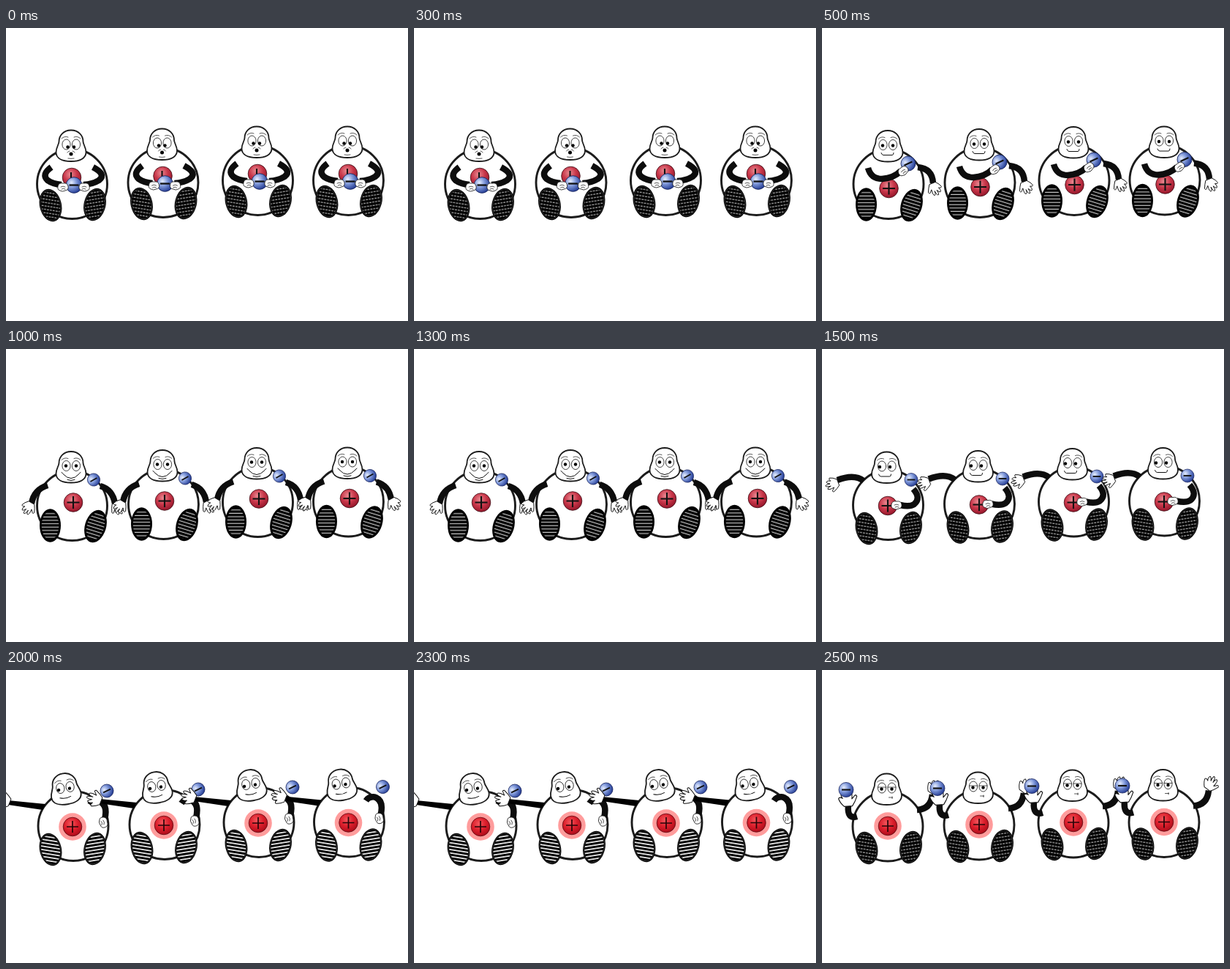
An HTML page without scripts that plays this animation: 550x400 px, repeating every 3000 ms.

```html
<!DOCTYPE html>
<html lang="en">
<head>
<meta charset="utf-8">
<title>Four round figures passing charges</title>
<style>
  html, body { margin: 0; width: 100%; height: 100%; overflow: hidden; background: #fff; }
  svg { display: block; width: 550px; height: 400px; }
  .pose { visibility: hidden; animation: show 3s step-end calc(var(--step) * .5s) infinite; }
  @keyframes show {
    0% { visibility: visible; }
    16.6666%, 100% { visibility: hidden; }
  }
  .body { fill: #fff; stroke: #1c1c1c; stroke-width: 2.9; }
  .skin { fill: #fff; stroke: #111; stroke-width: .8; stroke-linejoin: round; }
  .line { fill: none; stroke: #111; stroke-width: 1; stroke-linecap: round; }
  .thin { stroke-width: .7; }
  .arm { fill: none; stroke: #0d0d0d; stroke-width: 8.5; }
  .sign { fill: none; stroke: #111; stroke-width: 2.1; }
  .sole { fill: var(--sole, url(#fine)); }
  .out { fill: var(--sole, url(#slant)); }
</style>
</head>
<body>
<svg viewBox="0 0 550 400">
  <defs>
    <radialGradient id="blue" cx=".34" cy=".34" r=".72">
      <stop offset="0" stop-color="#e6edfd"/>
      <stop offset=".45" stop-color="#7f98da"/>
      <stop offset="1" stop-color="#1f3790"/>
    </radialGradient>
    <radialGradient id="red" cx=".42" cy=".34" r=".7">
      <stop offset="0" stop-color="#e88a92"/>
      <stop offset=".5" stop-color="#c9374a"/>
      <stop offset="1" stop-color="#8f1327"/>
    </radialGradient>
    <radialGradient id="hot" cx=".42" cy=".34" r=".7">
      <stop offset="0" stop-color="#f2565c"/>
      <stop offset=".5" stop-color="#dc1f2c"/>
      <stop offset="1" stop-color="#a80a18"/>
    </radialGradient>

    <pattern id="fine" width="40" height="4.6" patternUnits="userSpaceOnUse">
      <path d="M0 2H40" stroke="#fff"/>
    </pattern>
    <pattern id="slant" width="4" height="4.6" patternUnits="userSpaceOnUse" patternTransform="rotate(22)">
      <path d="M0 2H2.8" stroke="#fff" stroke-width=".9"/>
    </pattern>
    <pattern id="bold" width="40" height="4.6" patternUnits="userSpaceOnUse" patternTransform="rotate(22)">
      <path d="M0 2H40" stroke="#fff" stroke-width="1.6"/>
    </pattern>

    <g id="foot">
      <ellipse rx="14.5" ry="22.8"/>
      <ellipse class="sole" rx="11.8" ry="19.5"/>
    </g>
    <g id="footOut" transform="rotate(-13)">
      <ellipse rx="15" ry="22.5"/>
      <ellipse rx="13.6" ry="21" fill="none" stroke="#777" stroke-width=".4"/>
      <ellipse class="out" rx="12.6" ry="19.8"/>
    </g>
    <g id="feetOut">
      <use href="#footOut" x="61" y="243"/>
      <use href="#footOut" transform="translate(121.5 242) scale(-1 1)"/>
    </g>
    <g id="feetFlat">
      <use href="#foot" x="60.5" y="241"/>
      <use href="#foot" transform="translate(122.5 242) rotate(17)"/>
    </g>

    <ellipse id="body" class="body" cx="90.5" cy="213" rx="48" ry="47.5"/>

    <g id="head">
      <path d="M0-21.5C10-21.5 16.5-14.500 16.500-6C16.500-2 20.500 2 20.500 8.500C20.500 17 12 21 0 21S-20.500 17-20.500 8.500C-20.500 2-16.500-2-16.500-6C-16.500-14.500-10-21.500 0-21.500Z" fill="#fff" stroke="#1c1c1c" stroke-width="1.8"/>
      <g class="skin">
        <ellipse cx="-6.500" cy="-2" rx="5.600" ry="7"/>
        <ellipse cx="7" cy="-2" rx="5.600" ry="7"/>
      </g>
      <path class="line thin" d="M-13-10Q-9-14-4-12M4-12Q9-14 13-10"/>
    </g>
    <g id="pupils"><circle cx="-7" r="2.2"/><circle cx="7" r="2.2"/></g>
    <path id="flatMouth" class="line" d="M-9 9Q-8 12-6 12H6Q8 12 8 9"/>

    <path id="hand" class="skin" d="M-4 0Q-7 4-9 9Q-8 12-6 9L-4 7Q-5 14-3 15Q-1 15-1 10Q0 17 2 16Q3 15 2 10Q5 15 6 13Q7 11 5 8Q8 10 9 8Q8 4 4 0Z"/>
    <g id="fist">
      <path class="skin" d="M-7-1Q-6-6 0-5Q6-6 7-1Q8 4 3 5Q-1 7-4 5Q-8 4-7-1Z"/>
      <path class="line thin" d="M-3 0Q0-2 3 0M-2 3Q0 1 3 3"/>
    </g>

    <g id="minus">
      <circle r="10" fill="url(#blue)" stroke="#18245c" stroke-width=".8"/>
      <path class="sign" d="M-6 0H6"/>
    </g>
    <circle id="redBall" r="12.8" fill="url(#red)" stroke="#3a0c14" stroke-width=".8"/>
    <g id="plus">
      <use href="#redBall"/>
      <path class="sign" d="M-8.5 0H8.5M0-8.5V8.5"/>
    </g>
    <g id="hotPlus">
      <circle r="18.8" fill="#ff9c9c"/>
      <circle r="12.8" fill="url(#hot)" stroke="#5a0810" stroke-width=".8"/>
      <path d="M-8 0H8M0-8V8" stroke="#2a0508" stroke-width="1.7"/>
    </g>
  </defs>

  <!-- holding both charges -->
  <g class="pose" style="--step:0">
    <g id="hold">
      <use href="#body"/>
      <g transform="translate(89 161)">
        <use href="#head"/>
        <circle cx="-4.500" cy="1.500" r="2.200"/><circle cx="4" cy="1.500" r="2.200"/>
        <circle cy="11" r="2.500"/>
        <path class="line thin" d="M-5 9Q-4 7-2 7M2 7Q4 7 5 9M-4 17Q0 18 4 17"/>
      </g>
      <use href="#redBall" x="90" y="204"/>
      <path class="sign" d="M89 197V206"/>
      <path class="arm" d="M62 190Q48 200 57 208Q64 213 76 214M119 190Q138 200 127 208Q119 213 106 214"/>
      <use href="#minus" transform="translate(93 214.500) scale(1.08)"/>
      <use href="#fist" x="78" y="217"/>
      <use href="#fist" transform="translate(107 217) scale(-1 1)"/>
      <use href="#feetOut" y="-1"/>
    </g>
    <use href="#hold" x="124.5" y="-2"/>
    <use href="#hold" x="254" y="-5"/>
    <use href="#hold" x="378" y="-5"/>
  </g>

  <!-- lifting the minus to the shoulder -->
  <g class="pose" style="--step:1">
    <g id="lift">
      <use href="#body" x=".5"/>
      <use href="#plus" x="91.5" y="219"/>
      <path class="arm" d="M131 190Q151 192 152 212"/>
      <use href="#hand" transform="translate(151 212) rotate(-22) scale(1.1)"/>
      <g transform="translate(90 161.5)">
        <use href="#head"/>
        <use href="#pupils" y="-1"/>
        <use href="#flatMouth"/>
      </g>
      <path class="arm" d="M63 191Q67 206 82 206Q98 205 108 195"/>
      <use href="#minus" transform="translate(118 185) rotate(-25)"/>
      <use href="#fist" transform="translate(111 195) rotate(-35)"/>
      <use href="#feetFlat"/>
    </g>
    <use href="#lift" x="125" y="-2"/>
    <use href="#lift" x="254" y="-5"/>
    <use href="#lift" x="378" y="-5.5"/>
  </g>

  <!-- hand in hand -->
  <g class="pose" style="--step:2">
    <g id="link">
      <use href="#body" y="1"/>
      <use href="#plus" x="92" y="209.5"/>
      <path class="arm" d="M57 186Q38 192 35 211M129 187Q146 192 149 211"/>
      <use href="#hand" transform="translate(35 210) rotate(30) scale(-1.1 1.1)"/>
      <use href="#hand" transform="translate(149 210) rotate(-28) scale(1.1)"/>
      <g transform="translate(89 161.5)">
        <use href="#head"/>
        <use href="#pupils" y="-2"/>
        <path class="line" d="M-13 7Q-11 8-11 9Q0 21 11 9Q11 8 13 7M-5 17Q0 19 5 17"/>
      </g>
      <use href="#minus" transform="translate(120 178.5) rotate(-30) scale(.86)"/>
      <use href="#feetFlat"/>
    </g>
    <use href="#link" x="125" y="-2"/>
    <use href="#link" x="254" y="-5"/>
    <use href="#link" x="378" y="-5.5"/>
  </g>

  <!-- reaching left -->
  <g class="pose" style="--step:3">
    <g id="reach">
      <use href="#body"/>
      <path class="arm" d="M57 180Q44 170 21 179"/>
      <use href="#hand" transform="translate(22 182) rotate(68) scale(-1.1 1.1)"/>
      <g transform="translate(88.5 162)">
        <use href="#head"/>
        <use href="#pupils" x="-2.5" y="-1"/>
        <use href="#flatMouth" x="-2"/>
      </g>
      <use href="#minus" transform="translate(122 178.5) scale(.9)"/>
      <use href="#plus" x="90" y="214"/>
      <path class="arm" d="M125 191Q136 204 126 212Q120 216 107 213"/>
      <use href="#fist" x="102" y="213"/>
      <use href="#feetOut" y="2"/>
    </g>
    <use href="#reach" x="125" y="-1.5"/>
    <use href="#reach" x="254" y="-4.5"/>
    <use href="#reach" x="378" y="-5.5"/>
  </g>

  <!-- tapping the neighbour, plus glowing -->
  <g class="pose" style="--step:4;--sole:url(#bold)">
    <g id="tap">
      <use href="#body" x="1.5"/>
      <use href="#hotPlus" x="91" y="214"/>
      <path d="M3 178L54 183L50 191L3 184Z"/>
      <use href="#hand" transform="translate(5 181) rotate(112) scale(1.25)"/>
      <path class="arm" d="M115 184Q119 178 127 179Q140 183 135 204"/>
      <use href="#fist" transform="translate(133.5 208) rotate(80)"/>
      <g transform="translate(81 162.5) rotate(-9)">
        <use href="#head"/>
        <circle cx="-9" r="2.2"/><circle cx="6" r="2.2"/>
        <path class="line" d="M-9 11Q-1 14 6 11"/>
      </g>
      <use href="#minus" transform="translate(138 165) rotate(-25) scale(.9)"/>
      <use href="#feetOut" y="2"/>
    </g>
    <use href="#tap" x="125" y="-2"/>
    <use href="#tap" x="254" y="-5"/>
    <use href="#tap" x="377.5" y="-5.5"/>
  </g>

  <!-- passing the minus along -->
  <g class="pose" style="--step:5">
    <g id="pass">
      <use href="#body" x="-.5" y=".5"/>
      <use href="#hotPlus" x="90" y="213"/>
      <path class="arm" d="M48 200Q34 204 36 185M130 191Q149 190 151 170"/>
      <use href="#hand" transform="translate(149 168) rotate(216) scale(1.2)"/>
      <use href="#hand" transform="translate(36 186) rotate(176) scale(1.4)"/>
      <use href="#minus" x="33" y="163.500"/>
      <g transform="translate(88.5 163)">
        <use href="#head"/>
        <use href="#pupils" y="-.5"/>
        <path class="line thin" d="M-12-3H-1M1.500-3H12.500M3 11H8M7.500 10V12.500"/>
      </g>
      <use href="#feetOut"/>
    </g>
    <use href="#pass" x="125" y="-2"/>
    <use href="#pass" x="254" y="-5"/>
    <use href="#pass" x="378" y="-5.5"/>
  </g>
</svg>
</body>
</html>
```
